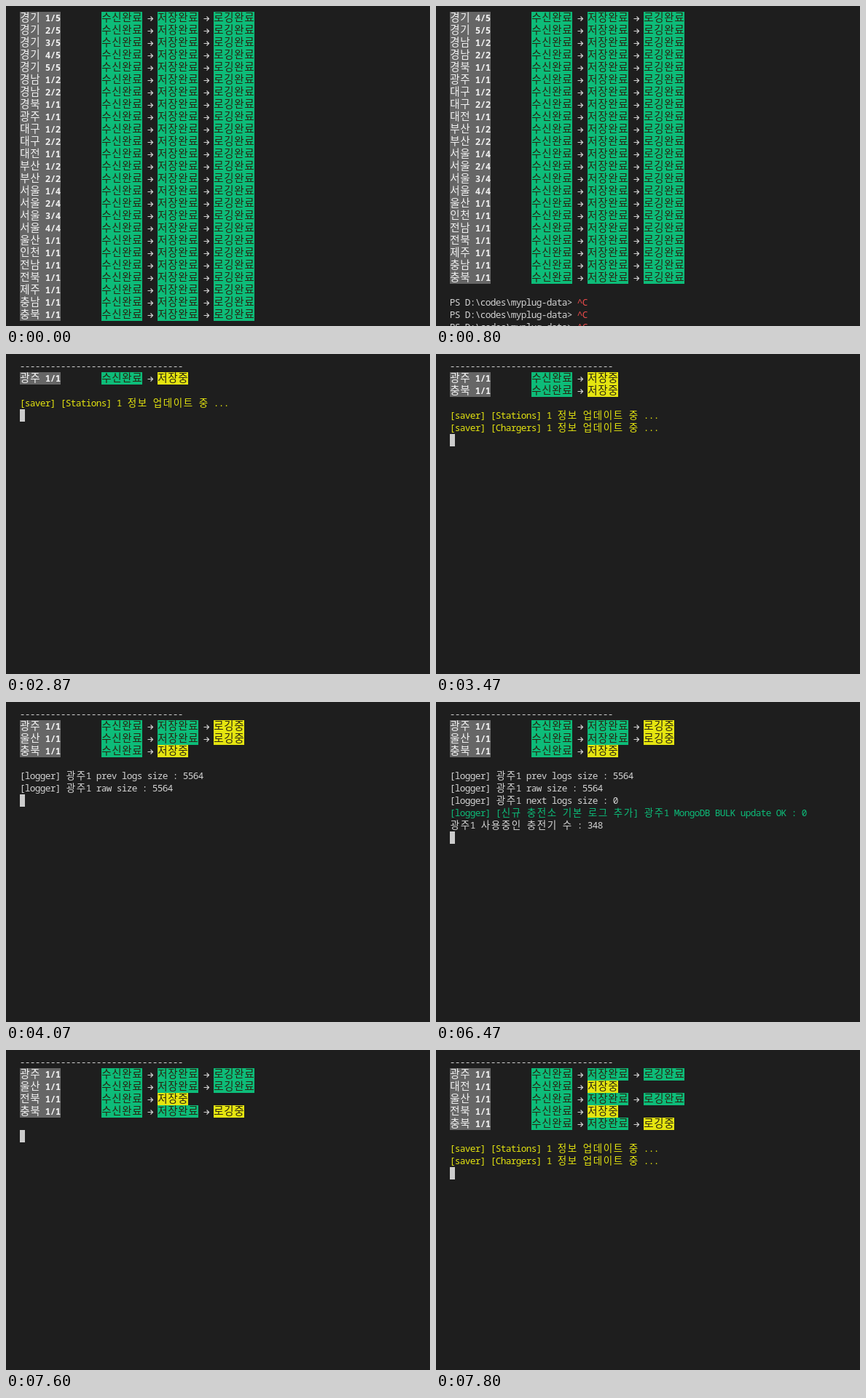
Recreate the animation shown at these times as an HTML page with a canvas. Size 582x440 px, loop 8000 ms.

```html
<!DOCTYPE html>
<html lang="ko">
<head>
<meta charset="utf-8">
<title>Terminal log</title>
<style>
  html, body { margin: 0; width: 100%; height: 100%; overflow: hidden; background: #1e1e1e; }
  canvas { display: block; }
</style>
</head>
<body>
<canvas id="screen" width="582" height="440"></canvas>
<script>
const LOOP = 8000;
const CELL = 7, LINE = 17, LEFT = 19, TOP = 8, BASELINE = 13;
const LATIN = '"Noto Sans Mono", "DejaVu Sans Mono", monospace';
const HANGUL = '"Noto Sans CJK KR", "Noto Sans CJK", "Noto Sans CJK JP", sans-serif';
// Fonts by style: normal text and the emphasised table.
const FONTS = {
  latin: { normal: `500 12.8px ${LATIN}`, bold: `bold 12.4px ${LATIN}` },
  hangul: { normal: `300 13.5px ${HANGUL}`, bold: `500 14.5px ${HANGUL}` }
};
const FG = '#d4d4d4', DARK = '#2a2412', WHITE = '#f2f2f2', GRAY = '#666666';
const GREEN = '#0dbc79', YELLOW = '#e5e510', RED = '#f14c4c';

const ctx = document.getElementById('screen').getContext('2d');
const isWide = ch => /[가-힣]/.test(ch);
const columns = text => [...text].reduce((n, ch) => n + (isWide(ch) ? 2 : 1), 0);

// A line is a list of styled segments.
const seg = (text, color = FG, back = null, bold = false) => ({ text, color, back, bold });
const plain = (text, color) => [seg(text, color)];
const blank = [];

// One region: `done` stages are complete, the next one is in progress.
function region(label, done) {
  const line = [seg(label, WHITE, GRAY, true), seg(' '.repeat(8))];
  ['수신', '저장', '로깅'].slice(0, done + 1).forEach((stage, i) => {
    if (i) line.push(seg(' → '));
    line.push(i < done ? seg(stage + '완료', DARK, GREEN, true)
                       : seg(stage + '중', DARK, YELLOW, true));
  });
  return line;
}

const counts = { 경기: 5, 경남: 2, 경북: 1, 광주: 1, 대구: 2, 대전: 1, 부산: 2, 서울: 4,
  울산: 1, 인천: 1, 전남: 1, 전북: 1, 제주: 1, 충남: 1, 충북: 1 };
const finished = Object.entries(counts).flatMap(([name, total]) =>
  Array.from({ length: total }, (_, i) => region(`${name} ${i + 1}/${total}`, 3)));

const prompt = 'PS D:\\codes\\myplug-data> ';
const interrupted = [seg(prompt), seg('^C', RED)];
const history = [
  ...finished, blank, interrupted, interrupted, interrupted,
  [seg(prompt), seg('node', '#f5f543'), seg(' index.js')],
  plain('(node:744) [MONGOOSE] DeprecationWarning: Mongoose: the `strictQuery` option will be'),
  plain(" by default in Mongoose 7. Use `mongoose.set('strictQuery', false);` if you want to"),
  plain("Or use `mongoose.set('strictQuery', true);` to suppress this warning."),
  plain('(Use `node --trace-deprecation ...` to show where the warning was created)')
];
const scrolled = (from, end) => ({ lines: history.slice(from, end) });

// Dashboard after a screen clear: region table, gap, log lines, cursor.
function board(table, ...logs) {
  const rows = Object.entries(table).map(([name, done]) => region(name + ' 1/1', done));
  const lines = [plain('-'.repeat(32)), ...rows, blank, ...logs];
  return { lines, cursor: lines.length };
}

const saving = kind => plain(`[saver] [${kind}] 1 정보 업데이트 중 ...`, YELLOW);
const saved = (kind, n) => plain(`[saver] [${kind}] 1 MongoDB BULK update OK : ${n}`, GREEN);
const stations = saving('Stations'), chargers = saving('Chargers');
const logging = (name, size, inUse) => [
  plain(`[logger] ${name} prev logs size : ${size}`),
  plain(`[logger] ${name} raw size : ${size}`),
  plain(`[logger] ${name} next logs size : 0`),
  plain(`[logger] [신규 충전소 기본 로그 추가] ${name} MongoDB BULK update OK : 0`, GREEN),
  plain(`${name} 사용중인 충전기 수 : ${inUse}`)
];
const logs = [...logging('광주1', 5564, 348), ...logging('울산1', 3109, 198)];

const pair = { 광주: 1, 충북: 1 };
const trio = { 광주: 2, 울산: 2, 충북: 1 };
const quartet = { 광주: 2, 울산: 2, 전북: 1, 충북: 1 };
const quintet = { 광주: 3, 대전: 1, 울산: 3, 전북: 1, 충북: 2 };

const timeline = [
  [0, scrolled(0, 26)],
  [800, scrolled(3, 29)],
  [1070, scrolled(4, 30)],
  [1130, scrolled(8)],
  [2870, board({ 광주: 1 }, stations)],
  [2930, board({ 광주: 1 }, stations, chargers)],
  [3270, board({ 광주: 1 }, stations, saved('Stations', 2085))],
  [3370, board(pair, stations)],
  [3470, board(pair, stations, chargers)],
  [3670, board({ 광주: 1, 울산: 1, 충북: 1 }, stations, chargers)],
  [3870, board({ 광주: 1, 울산: 1, 충북: 1 }, stations, saved('Stations', 927))],
  [3930, board({ 광주: 2, 울산: 1, 충북: 1 })],
  [4000, board(trio, ...logs.slice(0, 1))],
  [4070, board(trio, ...logs.slice(0, 2))],
  [6470, board(trio, ...logs.slice(0, 5))],
  [6530, board(trio, ...logs.slice(0, 7))],
  [7270, board(trio, ...logs)],
  [7330, board(quartet, stations)],
  [7400, board(quartet, stations, chargers)],
  [7600, board({ 광주: 3, 울산: 3, 전북: 1, 충북: 2 })],
  [7700, board(quintet, stations)],
  [7800, board(quintet, stations, chargers)]
];

function drawArrow(x, y) {
  ctx.lineWidth = 1.2;
  ctx.strokeStyle = ctx.fillStyle;
  ctx.stroke(new Path2D(`M${x} ${y}h7m-3 -3l3 3l-3 3`));
}

function drawSegment({ text, color, back, bold }, x, y) {
  if (back) {
    ctx.fillStyle = back;
    ctx.fillRect(x, y, columns(text) * CELL, LINE);
  }
  ctx.fillStyle = color;
  for (const ch of text) {
    const wide = isWide(ch);
    const width = wide ? 2 * CELL : CELL;
    if (ch === '→') {
      drawArrow(x + 0.5, y + 9.5);
    } else {
      ctx.font = FONTS[wide ? 'hangul' : 'latin'][bold ? 'bold' : 'normal'];
      ctx.fillText(ch, x + width / 2, y + BASELINE);
    }
    x += width;
  }
  return x;
}

function draw({ lines, cursor }) {
  ctx.fillStyle = '#1e1e1e';
  ctx.fillRect(0, 0, 582, 440);
  ctx.textAlign = 'center';
  lines.forEach((line, row) =>
    line.reduce((x, part) => drawSegment(part, x, TOP + row * LINE), LEFT));
  if (cursor !== undefined) {
    ctx.fillStyle = '#cccccc';
    ctx.fillRect(LEFT, TOP + cursor * LINE, CELL, LINE);
  }
}

function tick() {
  const time = performance.now() % LOOP;
  draw(timeline.findLast(([start]) => start <= time)[1]);
  requestAnimationFrame(tick);
}
tick();
</script>
</body>
</html>
```
